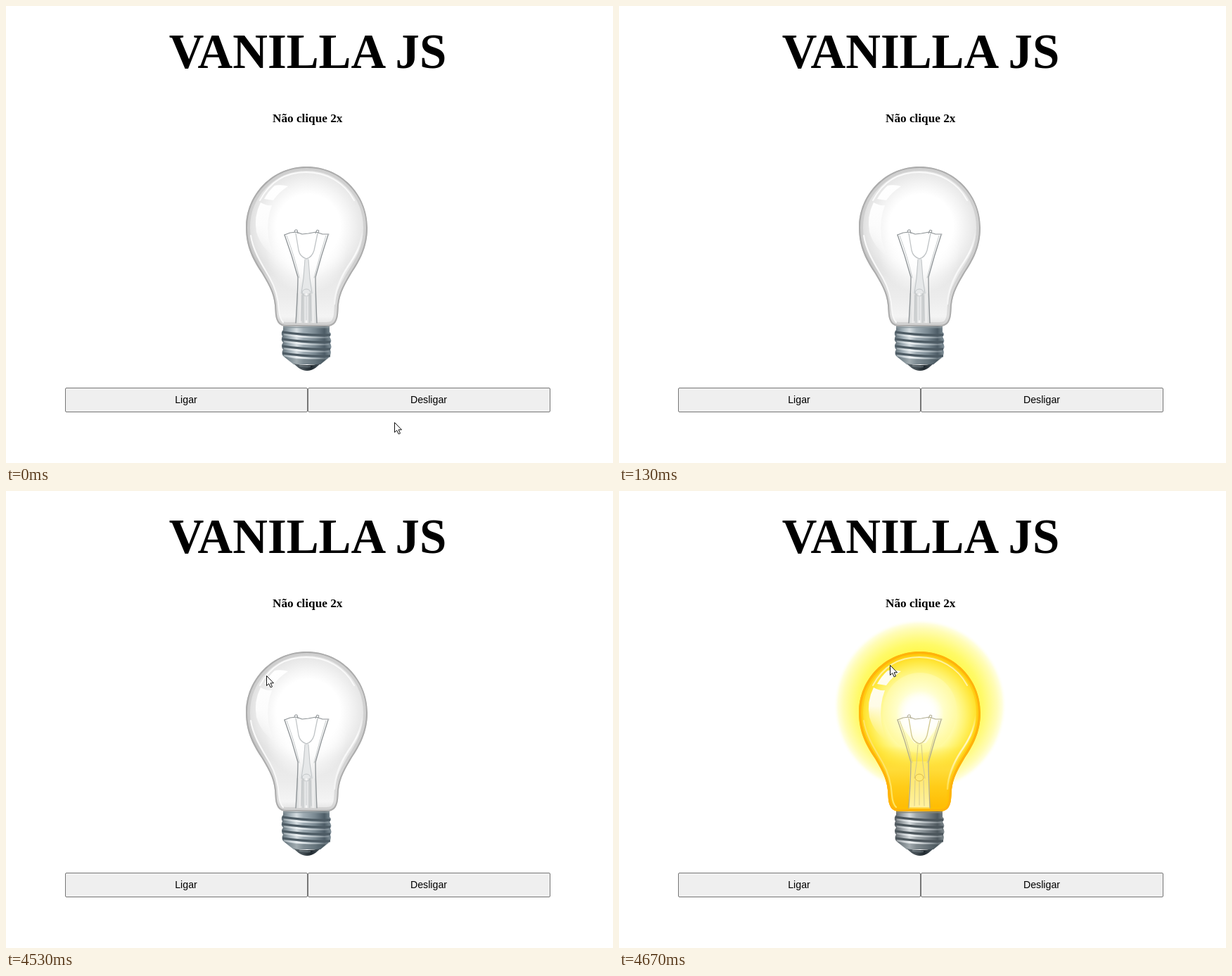
An HTML page with a canvas that plays this animation: 863x649 px, repeating every 4.74 s.

```html
<!DOCTYPE html>
<html lang="pt">
<head>
<meta charset="utf-8">
<title>Vanilla JS</title>
<style>
  html, body { margin: 0; width: 100%; height: 100%; overflow: hidden; background: #fff; }
  canvas, svg { position: absolute; left: 0; top: 0; }
  text { text-anchor: middle; fill: #000; }
  .serif { font-family: "Liberation Serif", "Times New Roman", serif; font-weight: bold; }
  .sans { font-family: "Liberation Sans", Arial, sans-serif; font-size: 14.2px; }
  rect { fill: #efefef; stroke: #767676; }
</style>
</head>
<body>
<canvas id="stage" width="863" height="649"></canvas>
<svg width="863" height="649">
  <text class="serif" x="429" y="88" font-size="68.8">VANILLA JS</text>
  <text class="serif" x="428.7" y="165" font-size="17.2">Não clique 2x</text>
  <rect x="84.5" y="542.5" width="344" height="34" rx="1.5"/>
  <rect x="429.5" y="542.5" width="344" height="34" rx="1.5"/>
  <text class="sans" x="256" y="564">Ligar</text>
  <text class="sans" x="601" y="564">Desligar</text>
</svg>
<script>
const ctx = document.getElementById('stage').getContext('2d');
const LOOP = 4740;

// start time, lamp state, pointer tip
const steps = [
  { at: 0, lit: false, tip: [552, 591] },
  { at: 70, lit: true },
  { at: 130, lit: false },
  { at: 4470, lit: false, tip: [88, 131] },
  { at: 4530, lit: false, tip: [370, 262] },
  { at: 4600, lit: true, tip: [392, 268] },
  { at: 4670, lit: true, tip: [385, 247] }
];

const glass = new Path2D('M427.5 228C476 228 514 267 514 315C514 343 503 362 491 380' +
  'C479 400 473 412 472.5 432C472 447 468 455 456 455L399 455C387 455 383 447 382.5 432' +
  'C382 412 376 400 364 380C352 362 341 343 341 315C341 267 379 228 427.5 228Z');
const shine = new Path2D('M382 255Q391 253 401 256Q388 264 380 276L367 274Q373 263 382 255Z' +
  'M362 279Q370 284 378 283Q370 303 373 328Q376 345 382 356Q363 344 356 321Q352 299 362 279Z');
const arch = new Path2D('M361 276C376 248 400 236 427 236C455 236 481 250 495 276');
const rimRight = new Path2D('M507 318C505 340 497 354 486 370C475 387 468 403 467 423');
const rimLeft = new Path2D('M348 326C351 347 364 367 375 386C383 400 387 413 388 432Q389 444 394 449');

function stops(g, list) {
  list.forEach(([p, c]) => g.addColorStop(p, c));
  return g;
}
const radial = (x, y, r, list) => stops(ctx.createRadialGradient(x, y, 0, x, y, r), list);
const linear = (x0, y0, x1, y1, list) => stops(ctx.createLinearGradient(x0, y0, x1, y1), list);

function fill(path, style) {
  ctx.fillStyle = style;
  ctx.fill(typeof path === 'string' ? new Path2D(path) : path);
}
function line(path, style, width) {
  ctx.strokeStyle = style;
  ctx.lineWidth = width;
  ctx.stroke(typeof path === 'string' ? new Path2D(path) : path);
}

function glow() {
  ctx.fillStyle = radial(428, 305, 123, [
    [0, '#fff94a'], [0.62, '#fff94e'], [0.72, '#fffa68'], [0.81, '#fffb90'],
    [0.89, '#fffcb6'], [0.95, '#fffedd'], [1, 'rgba(255,255,255,0)']
  ]);
  ctx.fillRect(304, 181, 248, 248);
}

function glassBody(lit) {
  ctx.save();
  ctx.clip(glass);
  if (lit) {
    fill(glass, radial(428, 318, 92, [
      [0, '#fff'], [0.2, '#fffffa'], [0.36, '#ffffd6'], [0.55, '#fffba8'], [0.7, '#fff36f'],
      [0.84, '#ffe638'], [0.94, '#ffd21a'], [1, '#ffc000']
    ]));
    ctx.fillStyle = linear(0, 362, 0, 455, [
      [0, 'rgba(255,222,50,0)'], [0.16, 'rgba(255,226,60,.5)'], [0.36, '#ffdc38'],
      [0.62, '#ffcc18'], [1, '#ffb900']
    ]);
    ctx.fillRect(340, 362, 176, 94);
    fill('M376 310A52 52 0 0 1 480 310A52 62 0 0 1 376 310Z', radial(428, 312, 62, [
      [0, '#fff'], [0.3, '#fffff2'], [0.55, '#fffec8'], [0.82, '#fffaa6'], [1, 'rgba(255,247,140,.4)']
    ]));
    fill('M414 384L441 384L442 451L412 451Z', linear(0, 384, 0, 451, [
      [0, 'rgba(255,246,155,.4)'], [0.5, '#ffea7c'], [1, '#fff2a4']
    ]));
  } else {
    fill(glass, radial(430, 313, 91, [
      [0, '#fff'], [0.5, '#fff'], [0.65, '#f5f5f5'], [0.84, '#e7e7e7'], [0.94, '#dedede'], [1, '#c8c8c8']
    ]));
    ctx.fillStyle = linear(0, 362, 0, 455, [
      [0, 'rgba(235,235,235,0)'], [0.25, '#e8e8e8'], [0.55, '#ececec'], [0.85, '#f4f4f4'], [1, '#dedede']
    ]);
    ctx.fillRect(340, 362, 176, 94);
    ctx.fillStyle = radial(428, 350, 58, [[0, '#fff'], [0.5, 'rgba(255,255,255,.8)'], [1, 'rgba(255,255,255,0)']]);
    ctx.fillRect(370, 290, 116, 118);
  }
  // thick soft edge, halved by the clip
  line(glass, lit ? 'rgba(255,196,0,.5)' : 'rgba(165,165,165,.3)', 12);
  line(glass, lit ? '#ffb20c' : '#acacac', lit ? 6.5 : 4);
  ctx.restore();

  ctx.lineCap = 'round';
  line(arch, lit ? '#fff2a0' : '#fafafa', 2);
  line(rimRight, linear(0, 318, 0, 423, lit
    ? [[0, 'rgba(255,247,184,0)'], [0.3, '#fff8c8'], [0.6, '#fff4a8'], [1, 'rgba(255,236,120,.6)']]
    : [[0, 'rgba(250,250,250,0)'], [0.3, '#fafafa'], [1, '#f4f4f4']]), 2.4);
  line(rimLeft, lit ? '#ffe566' : '#f8f8f8', 2.2);
  fill(shine, linear(0, 255, 0, 356, lit
    ? [[0, '#fffdf0'], [0.5, '#fffce8'], [1, 'rgba(255,245,150,0)']]
    : [[0, '#fff'], [0.55, '#fcfcfc'], [1, 'rgba(255,255,255,0)']]));
}

function filament(lit) {
  const dark = lit ? '#b0ac90' : '#8d9295';
  const pale = lit ? '#d2c88e' : '#c0c4c6';
  ctx.lineJoin = 'round';
  if (lit) {
    ctx.fillStyle = radial(428, 318, 34, [[0, '#fff'], [0.5, '#fff'], [1, 'rgba(255,255,255,0)']]);
    ctx.fillRect(394, 284, 68, 68);
    fill('M398 325L457 325Q443 350 436 358L420 358Q409 345 398 325Z', 'rgba(255,255,255,.6)');
  } else {
    fill('M425 359L430 359L432 386L437 408L417 408L422 386Z', '#e6e8e9');
    fill('M413 408L441 408L442 450L412 450Z', linear(412, 0, 442, 0, [
      [0, '#d2d5d6'], [0.2, '#eee'], [0.35, '#c9cccd'], [0.5, '#fafafa'], [0.65, '#c9cccd'], [0.82, '#f0f0f0'], [1, '#d2d5d6']
    ]));
  }
  // outer supports
  line('M396 325Q407 355 415 385Q415 404 412 450', dark, 1.3);
  line('M458 325Q448 355 440 385Q440 404 442 450', dark, 1.3);
  line('M399 326Q410 355 417 386', pale, 0.9);
  line('M455 326Q446 354 438 386', pale, 0.9);
  // wire
  line('M396 325L404 322L413 321L421 324L430 323L441 321L450 324L459 324', dark, 1.2);
  line('M412 323L416 347Q418 356 427 359Q435 357 438 347L443 323', pale, 1.3);
  line('M410 321L411 318L414 318L415 323M440 323L442 318L445 319L444 322', dark, 1);
  line('M425 360L423 387L420 408M430 360L432 387L435 408', pale, 1);
  line('M421 411L420 447M433 411L434 447M427 413L427 446', pale, 1);
  line('M421 407A6 5 0 0 1 433 407A6 5 0 0 1 421 407', lit ? '#d9b848' : '#c2c6c8', 1);
}

function screwBase(lit) {
  const metal = linear(392, 0, 462, 0, lit
    ? [[0, '#5c6368'], [0.14, '#969da2'], [0.3, '#d6dbde'], [0.44, '#a0a8ac'], [0.68, '#757e84'], [0.87, '#4f595f'], [1, '#7e888d']]
    : [[0, '#5f6d75'], [0.14, '#98a6ae'], [0.3, '#d5dde1'], [0.44, '#a0adb5'], [0.68, '#788790'], [0.87, '#4d5c66'], [1, '#808f98']]);
  fill('M394 455L460 455L460 463Q464 466 460 470Q464 475 461 479Q464 484 461 488Q463 493 460 498' +
    'L447 509L409 509L394 497Q391 492 394 488Q390 483 394 478Q390 474 393 469Q390 464 394 460Z', metal);
  ctx.lineCap = 'butt';
  for (let i = 0; i < 4; i++) {
    const y = 463 + i * 10;
    line(`M393 ${y}Q425 ${y + 5} 461 ${y + 4}`, lit ? '#4b555b' : '#4c5a63', 3);
    line(`M395 ${y + 3.6}Q425 ${y + 8.6} 459 ${y + 7.6}`, linear(395, 0, 459, 0, [
      [0, 'rgba(240,244,246,.3)'], [0.35, 'rgba(246,249,250,.85)'], [1, 'rgba(220,228,232,.25)']
    ]), 2);
  }
  fill('M395 498Q428 505 460 499L447 509L409 509Z', 'rgba(66,80,88,.35)');
  line('M394 456.5L460 456.5', lit ? '#8c8a76' : '#8b979d', 1.5);
  fill('M409 508Q428 512 447 508L440 514Q428 522 416 514Z', linear(409, 0, 447, 0, [
    [0, '#59646a'], [0.35, '#444e54'], [0.65, '#20292f'], [1, '#4d5960']
  ]));
  line('M417 511Q426 513 433 512', '#7c888e', 1.2);
}

function pointer([x, y]) {
  ctx.save();
  ctx.translate(x + 0.5, y + 0.5);
  const arrow = new Path2D('M0 0V14L3.2 11.1L5.7 16.4L8 15.4L5.6 10.3H10Z');
  ctx.lineJoin = 'miter';
  fill(arrow, '#fff');
  line(arrow, '#111', 1);
  ctx.restore();
}

function draw({ lit, tip }) {
  ctx.fillStyle = '#fff';
  ctx.fillRect(0, 0, 863, 649);
  if (lit) glow();
  glassBody(lit);
  filament(lit);
  screwBase(lit);
  if (tip) pointer(tip);
}

let start, shown;
function tick(now) {
  start ??= now;
  const t = (now - start) % LOOP;
  const step = steps.findLast(s => s.at <= t);
  if (step !== shown) draw(shown = step);
  requestAnimationFrame(tick);
}
draw(shown = steps[0]);
requestAnimationFrame(tick);
</script>
</body>
</html>
```
